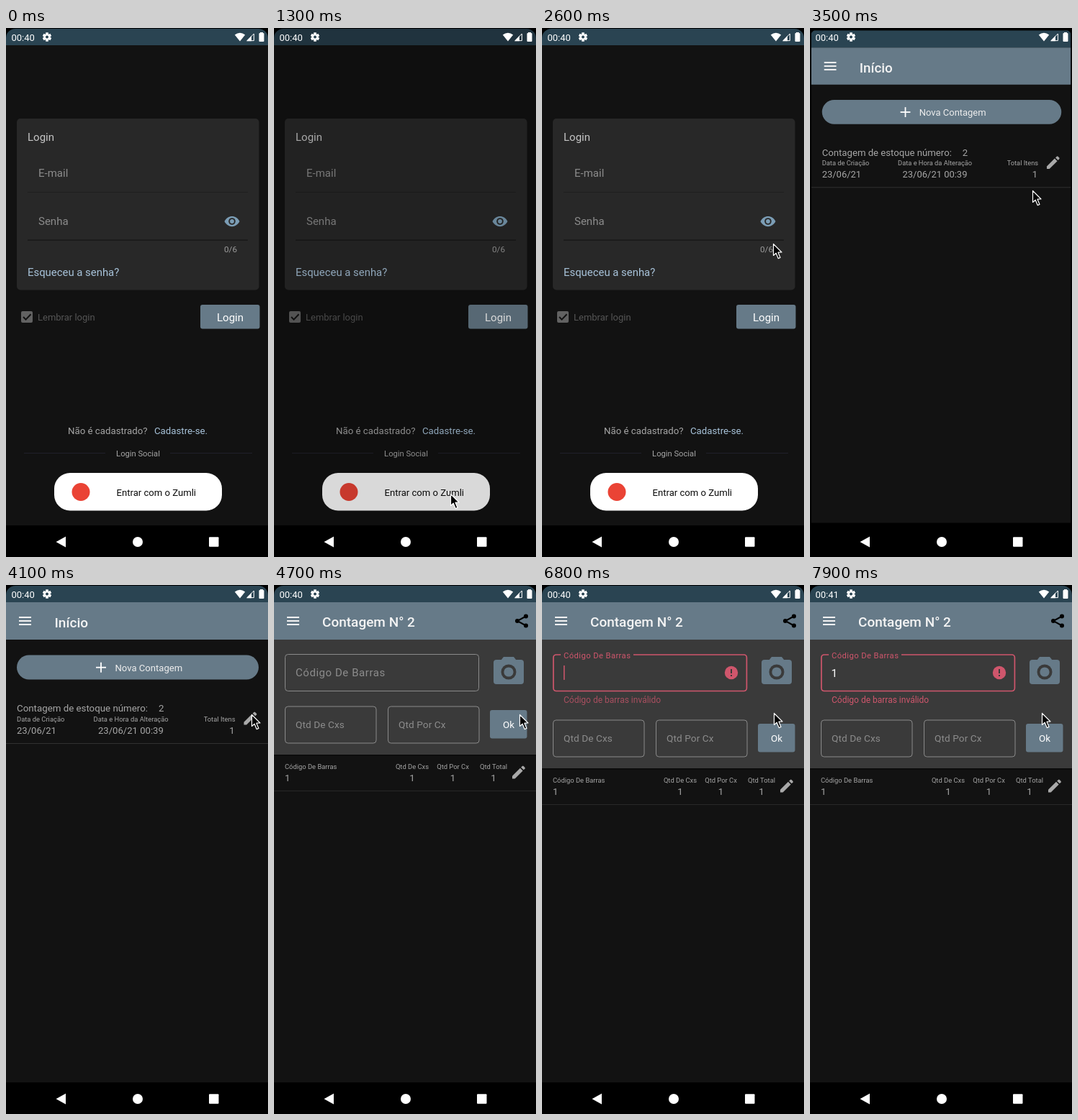
These frames come from a looping animation (364 px wide and 736 px high, 8000 ms). An HTML page with a canvas:

```html
<!DOCTYPE html>
<html lang="pt">
<head>
<meta charset="utf-8">
<title>Contagem de estoque</title>
<style>
html, body { margin: 0; width: 100%; height: 100%; overflow: hidden; background: #000; }
canvas { display: block; width: 364px; height: 736px; }
</style>
</head>
<body>
<canvas id="stage"></canvas>
<script>
const W = 364, H = 736, LOOP = 8000, STEP = 100;
const BG = '#121212', BLUE = '#667a88', LINK = '#a8c3da', ERR = '#cf566c', GREY = '#8c8c8c', BAR = '#2a4452';
const canvas = document.getElementById('stage');
const ctx = canvas.getContext('2d');
const dpr = window.devicePixelRatio || 1;
canvas.width = W * dpr;
canvas.height = H * dpr;

const clamp = v => Math.max(0, Math.min(1, v));
const mix = (a, b, p) => a + (b - a) * p;
const ramp = (t, from, to) => clamp((t - from) / (to - from));

// Pointer tip: time, x, y
const POINTER = [
  [400, 360, 674], [800, 296, 660], [1100, 245, 648], [2200, 245, 648],
  [2600, 321, 300], [3000, 316, 258], [3500, 309, 226], [3900, 290, 190],
  [4100, 341, 180], [5100, 341, 180], [5400, 319, 133], [5500, 319, 133],
  [6000, 327, 155], [6300, 322, 178]
];

function rect(x, y, w, h, color) {
  ctx.fillStyle = color;
  ctx.fillRect(x, y, w, h);
}

function round(x, y, w, h, r, color) {
  ctx.beginPath();
  ctx.roundRect(x, y, w, h, r);
  ctx.fillStyle = color;
  ctx.fill();
}

function disc(x, y, r, color) {
  ctx.beginPath();
  ctx.arc(x, y, r, 0, Math.PI * 2);
  ctx.fillStyle = color;
  ctx.fill();
}

function poly(points, color) {
  ctx.beginPath();
  points.forEach(([x, y]) => ctx.lineTo(x, y));
  ctx.closePath();
  ctx.fillStyle = color;
  ctx.fill();
}

function stroke(points, color, width) {
  ctx.beginPath();
  points.forEach(([x, y], i) => i ? ctx.lineTo(x, y) : ctx.moveTo(x, y));
  ctx.strokeStyle = color;
  ctx.lineWidth = width;
  ctx.stroke();
}

// y is the middle of the capitals
function text(s, x, y, size, color, { align = 'left', weight = 400, gap = 0 } = {}) {
  ctx.font = `${weight} ${size}px Roboto, "Liberation Sans", sans-serif`;
  ctx.letterSpacing = gap + 'px';
  ctx.textAlign = align;
  ctx.fillStyle = color;
  ctx.fillText(s, x, y + size * 0.355);
}

function group(fn, { x = 0, y = 0, scale = 1, alpha = 1 } = {}) {
  ctx.save();
  ctx.globalAlpha *= alpha;
  ctx.translate(x, y);
  ctx.scale(scale, scale);
  fn();
  ctx.restore();
}

function zoom(fn, scale, alpha) {
  group(fn, { x: 182 * (1 - scale), y: 346 * (1 - scale), scale, alpha });
}

function pencil(x, y) {
  group(() => {
    poly([[-9, 5.3], [2, -5.7], [5.7, -2], [-5.3, 9], [-9, 9]], '#a9a9a9');
    poly([[3.2, -6.8], [5.2, -8.7], [6.4, -8.7], [8.7, -6.4], [8.7, -5.2], [6.8, -3.2]], '#a9a9a9');
  }, { x, y });
}

function menu() {
  for (const y of [44, 49, 54]) rect(18, y, 17, 2, '#f2f2f2');
}

function share(x, y) {
  stroke([[x + 6, y - 6.5], [x - 6, y], [x + 6, y + 6.5]], '#000', 2);
  disc(x - 6, y, 3, '#000');
  disc(x + 6, y - 6.5, 3, '#000');
  disc(x + 6, y + 6.5, 3, '#000');
}

function eye(x, y) {
  ctx.beginPath();
  ctx.moveTo(x - 10.5, y);
  ctx.bezierCurveTo(x - 6, y - 9.5, x + 6, y - 9.5, x + 10.5, y);
  ctx.bezierCurveTo(x + 6, y + 9.5, x - 6, y + 9.5, x - 10.5, y);
  ctx.fillStyle = '#7b9db5';
  ctx.fill();
  disc(x, y, 4.8, '#282828');
  disc(x, y, 2.9, '#7b9db5');
}

function camera() {
  round(305, 104, 42, 34, 4, BLUE);
  poly([[315, 105], [319, 100], [333, 100], [337, 105]], BLUE);
  disc(326, 121, 10.5, '#3a3a3a');
  disc(326, 121, 6.6, BLUE);
}

function windowBase(header) {
  rect(0, 0, W, 692, BG);
  rect(0, 0, W, 24, BAR);
  if (header) rect(0, 24, W, 52, BLUE);
}

function login() {
  windowBase(false);
  round(15, 126, 336.5, 238.5, 5, '#282828');
  text('Login', 30, 152, 15, '#c6c6c6');
  text('E-mail', 45, 202, 15, GREY);
  rect(30, 228, 306, 1, '#1f1f1f');
  text('Senha', 45, 269, 15, GREY);
  eye(314, 269);
  rect(30, 294.5, 306, 1.2, '#151515');
  text('0/6', 303, 307.5, 11.7, '#9c9c9c');
  text('Esqueceu a senha?', 30, 340, 14.9, LINK);
  round(21, 394, 16, 16, 2, '#626262');
  stroke([[24, 402], [27.5, 405.6], [34.5, 398.2]], BG, 2);
  text('Lembrar login', 44, 402.5, 13, '#555');
  round(270, 385, 82.5, 33.5, 3, BLUE);
  text('Login', 311.5, 402.5, 15, '#fff', { align: 'center' });
  text('Não é cadastrado?', 86, 560.5, 13.25, '#a6a6a6');
  text('Cadastre-se.', 206, 560.5, 13.25, LINK);
  rect(25, 591, 113, 1, '#20202a');
  rect(228, 591, 114, 1, '#20202a');
  text('Login Social', 183.5, 592, 11.2, '#a6a6a6', { align: 'center' });
  round(67, 619, 233, 52.5, 22, '#fff');
  disc(104, 645.5, 12.5, '#ea4335');
  text('Entrar com o Zumli', 153.5, 646, 13.1, '#0a0a0a');
}

function home() {
  windowBase(true);
  menu();
  text('Início', 67.5, 52, 19, '#f4f4f4', { weight: 500 });
  round(15, 97.5, 336, 34, 17, BLUE);
  rect(125, 113.8, 14, 1.8, '#fff');
  rect(131.1, 107.7, 1.8, 14, '#fff');
  text('Nova Contagem', 151.5, 115, 13.1, '#eee');
  text('Contagem de estoque número:', 15, 171.5, 13.3, '#a6a6a6');
  text('2', 212, 171.5, 13.3, '#a6a6a6');
  text('Data de Criação', 15, 186.5, 9.4, '#a6a6a6');
  text('Data e Hora da Alteração', 121.5, 186.5, 9.4, '#a6a6a6');
  text('Total Itens', 318.5, 186.5, 9.4, '#a6a6a6', { align: 'right' });
  text('23/06/21', 15, 202, 13.1, '#a6a6a6');
  text('23/06/21 00:39', 128, 202, 13.1, '#a6a6a6');
  text('1', 317.5, 202, 13.1, '#a6a6a6', { align: 'right' });
  rect(0, 220, W, 1, '#303030');
  pencil(339.5, 185.5);
}

function field(x, y, w, label) {
  ctx.beginPath();
  ctx.roundRect(x + .5, y + .5, w - 1, 51, 4);
  ctx.strokeStyle = '#8a8a8a';
  ctx.lineWidth = 1;
  ctx.stroke();
  if (label) text(label, x + 15, y + 26, 13.6, GREY, { gap: .1 });
}

function codeField(t) {
  const bad = t >= 6600;
  const up = ramp(t, 6500, 6700);
  if (!bad) {
    field(15, 96, 270);
  } else {
    ctx.beginPath();
    ctx.roundRect(15.8, 97, 268.6, 50.5, 4);
    ctx.strokeStyle = ERR;
    ctx.lineWidth = 1.7;
    ctx.stroke();
    rect(26, 95, 101 * up, 4, '#3a3a3a');
    disc(263, 122, 9.2, ERR);
    rect(262, 117, 2, 6, '#3a3a3a');
    rect(262, 125, 2, 2, '#3a3a3a');
    group(() => text('Código de barras inválido', 30, 160, 12, ERR), { alpha: ramp(t, 6500, 6900) });
  }
  text('Código De Barras', 30, mix(122, 98, up), mix(15, 11.25, up), bad ? ERR : GREY,
    { gap: mix(.55, .4, up) });
  const typed = t >= 7600;
  if (typed) text('1', 29.5, 123, 15.2, '#fff');
  if (bad && t < 7900) rect(typed ? 38 : 30, 112, 1.5, 20, ERR);
}

function count(t) {
  const shift = t >= 6600 ? 19 : 0;
  windowBase(true);
  menu();
  text('Contagem N° 2', 67, 51, 19, '#f4f4f4', { weight: 500 });
  share(344, 50);
  rect(0, 76, W, 160 + shift, '#3a3a3a');
  codeField(t);
  camera();
  group(() => {
    field(15, 168.5, 127.5, 'Qtd De Cxs');
    field(158, 168.5, 127.5, 'Qtd Por Cx');
    round(300, 174, 51.5, 39.5, 3, BLUE);
    text('Ok', 326, 194.5, 13.4, '#fff', { align: 'center' });
    rect(0, 236, W, 2, '#0c0c0c');
    text('Código De Barras', 15, 252.5, 9.4, '#a6a6a6');
    text('1', 15, 268, 13.1, '#a6a6a6');
    [['Qtd De Cxs', 192], ['Qtd Por Cx', 248.5], ['Qtd Total', 305]].forEach(([s, x]) => {
      text(s, x, 252.5, 9.4, '#a6a6a6', { align: 'center' });
      text('1', x, 268, 13.1, '#a6a6a6', { align: 'center' });
    });
    rect(0, 286, W, 1, '#282828');
    pencil(340, 260.5);
  }, { y: shift });
}

function gear(x, y) {
  ctx.save();
  ctx.translate(x, y);
  for (let i = 0; i < 6; i++) {
    rect(-1.7, -6, 3.4, 12, '#fff');
    ctx.rotate(Math.PI / 3);
  }
  ctx.restore();
  disc(x, y, 4.5, '#fff');
  disc(x, y, 2, BAR);
}

function systemBars(t) {
  text(t < 7300 ? '00:40' : '00:41', 7.5, 13, 13, '#fff');
  gear(57, 12.5);
  ctx.beginPath();
  ctx.moveTo(325, 18.5);
  ctx.lineTo(317.8, 9.5);
  ctx.quadraticCurveTo(325, 4, 332.2, 9.5);
  ctx.fillStyle = '#fff';
  ctx.fill();
  stroke([[335, 17.6], [344.4, 17.6], [344.4, 8], [335, 17.6]], '#fff', 1);
  poly([[334, 18.2], [341, 11], [341, 18.2]], '#fff');
  rect(353, 6, 4, 2, '#fff');
  round(351.5, 7, 7, 12, 1, '#fff');
  rect(0, 692, W, 44, '#000');
  poly([[69.5, 715], [83, 707.5], [83, 722.5]], '#fff');
  disc(183, 715, 7, '#fff');
  round(282, 708.3, 13.5, 13.5, 1, '#fff');
}

// Rounded top corners of the display
function corners() {
  rect(0, 0, W, 1, '#000');
  ctx.beginPath();
  ctx.rect(0, 0, W, 16);
  ctx.roundRect(0, 1, W, 40, 13);
  ctx.save();
  ctx.clip('evenodd');
  rect(0, 0, W, 15, '#000');
  ctx.restore();
}

function pointer(t) {
  if (t < POINTER[0][0]) return;
  let i = POINTER.findIndex(k => k[0] > t);
  if (i < 0) i = POINTER.length;
  const a = POINTER[i - 1], b = POINTER[i] || a;
  const p = b === a ? 0 : ramp(t, a[0], b[0]);
  group(() => {
    const shape = [[.5, .5], [.5, 16.5], [4.2, 13.2], [7.2, 20.6], [10, 19.4], [7, 12.2], [12, 12]];
    ctx.lineJoin = 'round';
    poly(shape, '#000');
    ctx.strokeStyle = '#fff';
    ctx.lineWidth = 1.2;
    ctx.stroke();
  }, { x: mix(a[1], b[1], p), y: mix(a[2], b[2], p) });
}

function draw(t) {
  ctx.setTransform(dpr, 0, 0, dpr, 0, 0);
  rect(0, 0, W, H, '#000');
  if (t < 3100) {
    login();
    const dim = ramp(t, 1200, 1600) * (1 - ramp(t, 2100, 2500));
    rect(0, 24, W, 668, `rgba(0,0,0,${.6 * dim})`);
    rect(0, 0, W, 24, `rgba(0,0,0,${dim})`);
  } else if (t < 4500) {
    const p = ramp(t, 3000, 3600);
    const ease = Math.pow(1 - p, 1.5);
    if (t < 3400) zoom(login, 1 + .06 * p, 1 - ramp(t, 3000, 3400));
    zoom(home, 1 - .15 * ease, ramp(t, 3000, 3250));
  } else {
    const p = ramp(t, 4400, 4700);
    if (p < 1) home();
    group(() => count(t), { alpha: p });
  }
  corners();
  systemBars(t);
  pointer(t);
}

const start = performance.now();
function tick() {
  const t = (performance.now() - start) % LOOP;
  draw(Math.floor(t / STEP) * STEP);
  requestAnimationFrame(tick);
}
tick();
</script>
</body>
</html>
```
